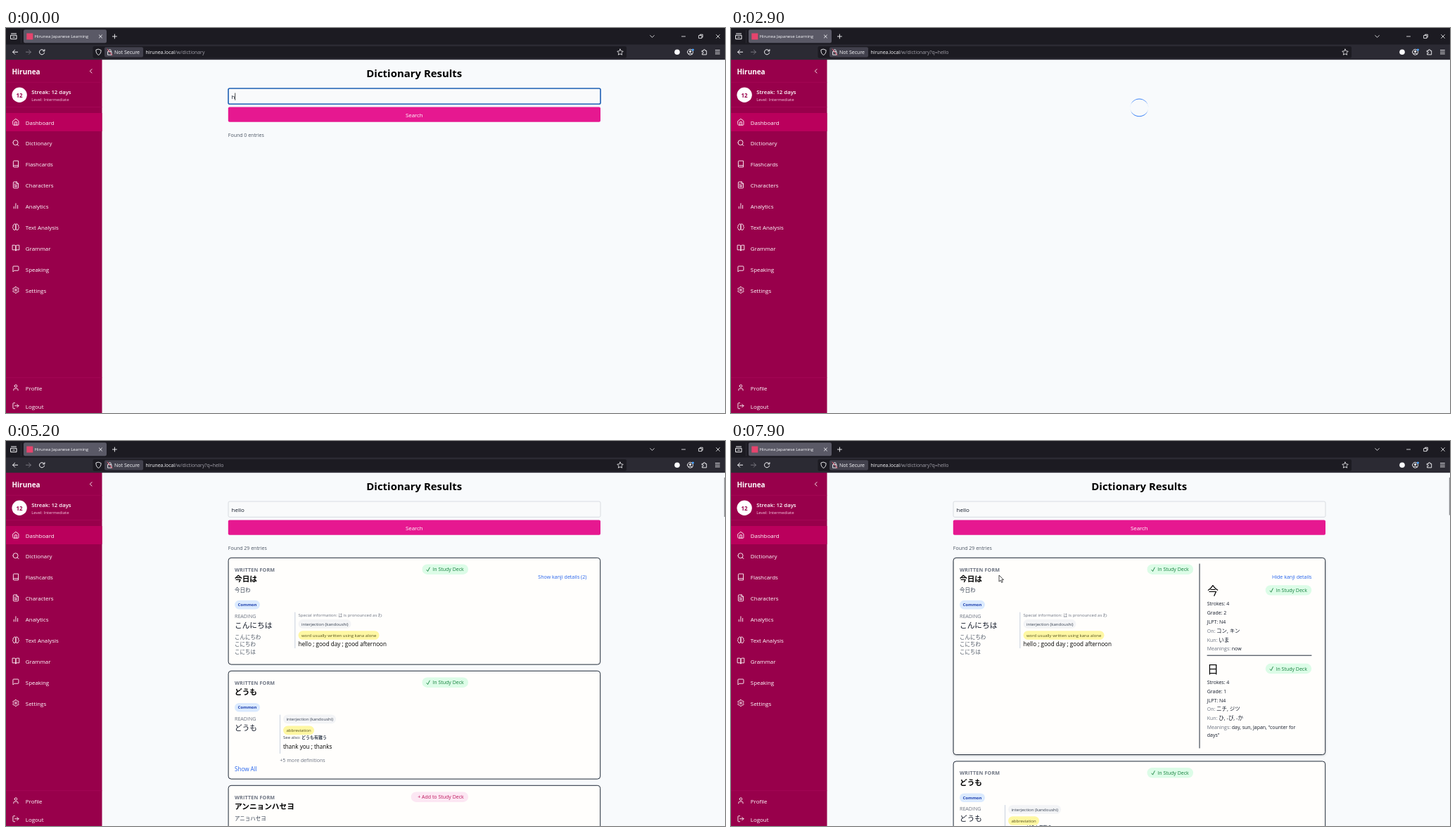
Animation, 1022 px wide and 548 px high, one loop 8 s. Source, as an HTML page:

```html
<!DOCTYPE html>
<html lang="en">
<head>
<meta charset="utf-8">
<title>Dictionary search</title>
<style>
  html, body { margin: 0; width: 100%; height: 100%; overflow: hidden; background: #f8fafc; }
  svg { display: block; width: 1022px; height: 548px; }
  text { font-family: "Open Sans", "Noto Sans CJK JP", "Noto Sans CJK", sans-serif; white-space: pre; }
  .line { fill: none; stroke-linecap: round; stroke-linejoin: round; }
</style>
</head>
<body>
<svg id="stage" viewBox="0 0 1022 548"></svg>
<script>
const LOOP = 8000, STEP = 100;
const SUBMIT = 900, LOADED = 4000, DECK_READY = 4800, POINTER_IN = 5400, EXPAND = 6400;
const POINTER_PATH = [[5400, 640, 300], [5800, 808, 190], [6400, 808, 190], [7000, 796, 294],
  [7600, 819, 327], [7700, 819, 327], [7900, 381, 191], [8000, 381, 191]];
const INK = '#111827', GRAY = '#6b7280', BLUE = '#2563eb', EDGE = '#1f2937';
const BOLD = 'font-weight="700"', MEDIUM = 'font-weight="500"', CENTER = 'text-anchor="middle"';

const text = (s, x, y, size, fill = INK, extra = '') =>
  `<text x="${x}" y="${y}" font-size="${size}" fill="${fill}" ${extra}>${s}</text>`;
const rect = (x, y, w, h, fill, r = 0, extra = '') =>
  `<rect x="${x}" y="${y}" width="${w}" height="${h}" rx="${r}" fill="${fill}" ${extra}/>`;
const line = (d, color, width = 1, extra = '') =>
  `<path class="line" d="${d}" stroke="${color}" stroke-width="${width}" ${extra}/>`;
const dot = (x, y, r, fill) => `<circle cx="${x}" cy="${y}" r="${r}" fill="${fill}"/>`;
const ring = (x, y, r) => `M${x - r} ${y}a${r} ${r} 0 1 0 ${2 * r} 0a${r} ${r} 0 1 0 ${-2 * r} 0`;
const group = (id, content) => `<g id="${id}">${content}</g>`;
const dark = (s, size = 6.95) => `<tspan font-size="${size}" fill="${INK}">${s}</tspan>`;

function gear() {
  const points = [];
  for (let i = 0; i < 24; i++) {
    const a = (i - .5) * Math.PI / 12, r = i % 4 < 2 ? 10.2 : 7.8;
    points.push(`${(12 + r * Math.sin(a)).toFixed(1)} ${(12 - r * Math.cos(a)).toFixed(1)}`);
  }
  return `M${points.join('L')}z${ring(12, 12, 3)}`;
}

const MENU = [
  ['Dashboard', 'M3 9l9-7 9 7v11a2 2 0 0 1-2 2H5a2 2 0 0 1-2-2zM9 22V12h6v10'],
  ['Dictionary', ring(11, 11, 8) + 'M21 21l-4.3-4.3'],
  ['Flashcards', 'M4 19.5v-15A2.5 2.5 0 0 1 6.5 2H20v20H6.5a2.5 2.5 0 0 1 0-5H20'],
  ['Characters', 'M14 2H6a2 2 0 0 0-2 2v16a2 2 0 0 0 2 2h12a2 2 0 0 0 2-2V8zV8h6M16 13H8M16 17H8M10 9H8'],
  ['Analytics', 'M18 20V10M12 20V4M6 20v-6'],
  ['Text Analysis', 'M12 5a3 3 0 1 0-6 .1 4 4 0 0 0-2.5 5.8 4 4 0 0 0 .5 6.6A4 4 0 1 0 12 18z' +
    'M12 5a3 3 0 1 1 6 .1 4 4 0 0 1 2.5 5.8 4 4 0 0 1-.5 6.6A4 4 0 1 1 12 18z'],
  ['Grammar', 'M2 3h6a4 4 0 0 1 4 4v14a3 3 0 0 0-3-3H2zM22 3h-6a4 4 0 0 0-4 4v14a3 3 0 0 1 3-3h7z'],
  ['Speaking', 'M21 15a2 2 0 0 1-2 2H7l-4 4V5a2 2 0 0 1 2-2h14a2 2 0 0 1 2 2z'],
  ['Settings', gear()],
];
const PROFILE = ['Profile', 'M19 21v-2a4 4 0 0 0-4-4H9a4 4 0 0 0-4 4v2' + ring(12, 7, 4)];
const LOGOUT = ['Logout', 'M9 21H5a2 2 0 0 1-2-2V5a2 2 0 0 1 2-2h4M16 17l5-5-5-5M21 12H9'];

const menuItem = ([label, icon], y) =>
  line(icon, '#fff', 2, `transform="translate(8.6 ${y - 5.8}) scale(.4445)"`) +
  text(label, 27.8, y + 3.3, 7.93, '#fff');

function browser() {
  const lit = '#fbfbfe';
  return rect(0, 0, 1022, 24, '#1c1b22') + rect(0, 23.5, 1022, 21.7, '#2b2a33') +
    line('M21.5 3v18', '#33323c', .7) + rect(25, 2.3, 118, 19, '#5a5966', 2.2) +
    rect(29.3, 7.5, 9, 9, '#e5446d') +
    text('Hirunea Japanese Learning', 40.6, 14.4, 6.1, lit) +
    line('M132.4 10l4 4m0-4l-4 4M154.4 9v6m-3-3h6', lit, .9) +
    line('M7.5 8h7M7 10.3h8v5.4H7zM9.7 13h2.6', lit, 1) +
    line('M915.7 10.6l2.8 2.8 2.8-2.8M960.5 12h5M985 10.6h4v4h-4zM986.5 10.4V9.2h3.8v3.9h-1.1M1009.6 9.6l4.8 4.8m0-4.8l-4.8 4.8', lit, .8) +
    rect(123.5, 26, 758.5, 16.8, '#1c1b22', 2.2) + rect(140, 27.2, 55, 14.4, '#42414d', 2) +
    line('M16.6 34.2h-7m3-3l-3 3 3 3M54.2 32.4a3.6 3.6 0 1 0 .4 2.8M54.9 30.6v2.3h-2.3', lit, 1) +
    line('M28.4 34.2h7m-3-3l3 3-3 3', '#77767f', 1) +
    line('M131.5 30.2l3.6 1.3c0 3.5-1 5.7-3.6 7-2.6-1.3-3.6-3.5-3.6-7z', lit, .9) +
    line('M145 33.6h5v4.6h-5zM146 33.4v-1.6a1.6 1.6 0 0 1 3.1 0v1.6', lit, .9) +
    line('M144 30l7 8.6', '#ff5a76', .9) +
    text('Not Secure', 154, 37, 7.05, lit) +
    `<text x="198.5" y="37" font-size="6.9" fill="${lit}">hirunea.local<tspan id="path" fill="#a3a2ab"></tspan></text>` +
    line('M873 30.1l1.3 2.7 2.9.4-2.1 2.1.5 2.9-2.6-1.4-2.6 1.4.5-2.9-2.1-2.1 2.9-.4z', lit, .8) +
    dot(954, 34.3, 3.8, lit) +
    line(ring(972.6, 34.3, 4) + 'M970.2 37a2.9 2.9 0 0 1 4.8 0', lit, .9) + dot(972.6, 33.2, 1.5, lit) + dot(976.4, 31, 1.6, '#4aa3ff') +
    line('M989.6 32.3h1.9a1.2 1.2 0 1 1 2.2 0h2v5.6h-6.1v-1.8a1.2 1.2 0 1 0 0-2.1z', lit, .9) +
    line('M1008.4 31.6h6m-6 2.6h6m-6 2.6h6', lit, .9);
}

function sidebar() {
  return rect(0, 45, 136.5, 503, '#98004b') + rect(0, 121, 136.5, 26, '#ba005c') +
    line('M0 77.3h136M0 112.5h136M0 497.7h136', '#aa0a5a', .7) +
    text('Hirunea', 8.5, 66.2, 9.93, '#fff', BOLD) +
    line('M122 58.6l-2.6 2.7 2.6 2.7', '#fff', .9) +
    dot(19.1, 95.2, 10.7, '#fff') + text('12', 19.1, 98.5, 7.9, '#98004b', BOLD + CENTER) +
    text('Streak: 12 days', 36.2, 94.4, 7.8, '#fff', 'font-weight="600"') +
    text('Level: Intermediate', 36.2, 103.8, 5.97, '#f5c6de') +
    MENU.map((item, i) => menuItem(item, 134.2 + i * 29.9)).join('') +
    menuItem(PROFILE, 512.3) + menuItem(LOGOUT, 538.2);
}

function badge(y, added = true, right = 657) {
  const w = added ? 65.5 : 81.3, x = right - w, color = added ? '#15803d' : '#be185d';
  const label = added ? 'In Study Deck' : '+ Add to Study Deck';
  return `<g class="badge">${rect(x, y - 7.2, w, 14.4, added ? '#dcfce7' : '#fce7f3', 7.2)}` +
    (added ? line(`M${x + 6.5} ${y + .8}l1.5 2 2.7-5.4`, color, .9) : '') +
    text(label, right - 6.3, y + 2.6, 7, color, MEDIUM + ' text-anchor="end"') + '</g>';
}

const pill = (label, x, y, w, fill, color, extra = '') =>
  rect(x, y, w, 12.6, fill, 6.3) + text(label, x + 4.4, y + 8.5, 6.05, color, extra);
const common = y => pill('Common', 325, y, 36, '#dbeafe', '#1e40af', BOLD);
const grammar = (x, y) => pill('interjection (kandoushi)', x, y, 75, '#f3f4f6', '#374151');
const note = (label, x, y, w) => pill(label, x, y, w, '#fef7a3', '#57531f');

const card = (top, height, word, added, id = '') =>
  rect(316.1, top + .3, 528.6, height, '#fffefc', 4, `stroke="${EDGE}" stroke-width="1" ${id}`) +
  text('WRITTEN FORM', 325, top + 19.5, 7.15, GRAY, BOLD + ' letter-spacing=".025em"') +
  text(word, 325, top + 34, 10.67, '#000', BOLD) + badge(top + 16.7, added);

function kanji(dy, sign, facts, on, kun, meaning) {
  return text(sign, 677, 219 + dy, 16, '#000') + badge(212.4 + dy, true, 825.2) +
    facts.map((fact, i) => text(fact, 676.8, 234.4 + dy + i * 12.8, 6.95)).join('') +
    text('On: ' + dark(on, 7.47), 676.8, 272.8 + dy, 6.95, GRAY) +
    text('Kun: ' + dark(kun, 7.47), 676.8, 285.6 + dy, 6.95, GRAY) +
    text('Meanings: ' + dark(meaning), 676.8, 298.4 + dy, 6.95, GRAY);
}

function results() {
  const details = line('M666 175v262M677 305.2h148', EDGE, 1) +
    kanji(0, '今', ['Strokes: 4', 'Grade: 2', 'JLPT: N4'], 'コン, キン', 'いま', 'now') +
    kanji(111.6, '日', ['Strokes: 4', 'Grade: 1', 'JLPT: N4'], 'ニチ, ジツ', 'ひ, -び, -か', 'day, sun, Japan, "counter for') +
    text('days"', 676.8, 420.6, 6.95);
  const first = card(166, 151.8, '今日は', true, 'id="firstCard"') +
    text('今日わ', 325, 215.4, 7.47, '#374151') + common(226.8) +
    text('READING', 325, 251.6, 7.1, GRAY) + text('こんにちは', 325, 266, 10.67) +
    ['こんにちわ', 'こにちわ', 'こにちは'].map((s, i) => text(s, 325, 281.8 + i * 10.6, 7.47, '#4b5563')).join('') +
    line('M410.8 244v50.5', '#cbd5e1', 1.1) +
    text('Special information: は is pronounced as わ', 415.5, 250.1, 5.95, GRAY) +
    grammar(415.5, 254.1) + note('word usually written using kana alone', 415.5, 270.2, 115) +
    text('hello ; good day ; good afternoon', 415.5, 291.6, 8.15, '#000') +
    text('', 825.4, 195.6, 7.1, BLUE, 'id="toggle" text-anchor="end"');
  const second = card(327, 153.8, 'どうも', true) + common(372.9) +
    text('READING', 325, 397.6, 7.1, GRAY) + text('どうも', 325, 412, 10.67) +
    line('M389.5 390v54.5', '#cbd5e1', 1.1) + grammar(394, 389.6) + note('abbreviation', 394, 405.6, 44) +
    text(`See also: <tspan ${BOLD}>どうも有難う</tspan>`, 394, 423.8, 6, '#374151') +
    text('thank you ; thanks', 394, 437.6, 8.1, '#000') +
    text('+5 more definitions', 389.3, 457.3, 7.1, GRAY) + text('Show All', 325, 469.5, 8.15, BLUE);
  const third = card(490, 150, 'アンニョンハセヨ', false) + text('アニョハセヨ', 325, 539.7, 7.47, '#374151');
  return first + group('details', details) + group('lower', second + third) +
    rect(1020.8, 52, 1.2, 56, '#8b8d93', 0, 'id="thumb"');
}

const form = text('Dictionary Results', 580.3, 69.7, 14.95, '#000', BOLD + CENTER) +
  rect(316, 86, 529, 22.3, '#f9fafb', 2, 'id="field"') +
  text('', 320.5, 100.6, 8, INK, 'id="query"') + rect(0, 92.5, .7, 10.3, '#000', 0, 'id="caret"') +
  rect(315.8, 112.4, 529.2, 21.4, '#e61890', 2) + text('Search', 580.3, 126.8, 7.9, '#fff', CENTER) +
  text('', 315.8, 155.3, 7, '#4b5563', 'id="found"');

// Only the top and bottom borders are drawn, so the ring tapers at the sides.
const spinner = `<path id="spinner" fill="#3b82f6" fill-rule="evenodd"
  d="M-12.9 0a12.9 12.9 0 1 0 25.8 0a12.9 12.9 0 1 0-25.8 0M-12.9 0a12.9 11.8 0 1 0 25.8 0a12.9 11.8 0 1 0-25.8 0"/>`;
const pointer = `<path id="pointer" d="M0 0v9.2l2.2-2 1.5 3.3 1.5-.7-1.5-3.2h2.8z" fill="#fff" stroke="#222" stroke-width=".8"/>`;

document.getElementById('stage').innerHTML = rect(0, 0, 1022, 548, '#f8fafc') +
  group('form', form) + group('results', results()) + spinner + sidebar() + browser() + pointer;

const $ = id => document.getElementById(id);
const show = (id, on) => { $(id).style.display = on ? '' : 'none'; };
const set = (id, attributes) => Object.entries(attributes).forEach(([k, v]) => $(id).setAttribute(k, v));
const badges = document.querySelectorAll('.badge');

function pointerAt(t) {
  const i = Math.max(1, POINTER_PATH.findIndex(p => p[0] >= t));
  const [t0, x0, y0] = POINTER_PATH[i - 1], [t1, x1, y1] = POINTER_PATH[i];
  const k = Math.max(0, (t - t0) / (t1 - t0));
  return [x0 + (x1 - x0) * k, y0 + (y1 - y0) * k];
}

function render(t) {
  const typing = t < SUBMIT, loaded = t >= LOADED, expanded = t >= EXPAND, pointing = t >= POINTER_IN;
  show('form', typing || loaded);
  show('results', loaded);
  show('spinner', !typing && !loaded);
  show('caret', typing);
  show('details', expanded);
  show('pointer', pointing);

  $('path').textContent = '/w/dictionary' + (typing ? '' : '?q=hello');
  $('query').textContent = 'hello'.slice(0, 1 + Math.floor(t / 150));
  $('found').textContent = `Found ${loaded ? 29 : 0} entries`;
  $('toggle').textContent = expanded ? 'Hide kanji details' : 'Show kanji details (2)';
  if (typing) set('caret', { x: 320.5 + $('query').getComputedTextLength() });
  set('field', typing ? { stroke: '#1d5fb4', 'stroke-width': 1.6 } : { stroke: '#d1d5db', 'stroke-width': .8 });
  set('spinner', { transform: `translate(580.3 113.4) rotate(${(t - 2900) * .36})` });

  const [x, y] = pointerAt(t);
  set('pointer', { transform: `translate(${x} ${y})` });
  set('toggle', { fill: pointing && x > 755 && y < 198 ? '#1e40af' : BLUE });
  set('firstCard', { height: expanded ? 280.2 : 151.8 });
  $('firstCard').style.filter = pointing ? 'drop-shadow(0 1.5px 1.5px rgba(0,0,0,.18))' : '';
  set('lower', { transform: `translate(0 ${expanded ? 128.6 : 0})` });
  set('thumb', { height: expanded ? 53.5 : 56 });
  const ready = Math.min(1, Math.max(0, (t - DECK_READY) / 200));
  badges.forEach(b => b.setAttribute('opacity', .5 + .5 * ready));
}

const start = performance.now();
function tick() {
  const t = (performance.now() - start) % LOOP;
  render(Math.floor(t / STEP) * STEP);
  requestAnimationFrame(tick);
}
tick();
</script>
</body>
</html>
```
